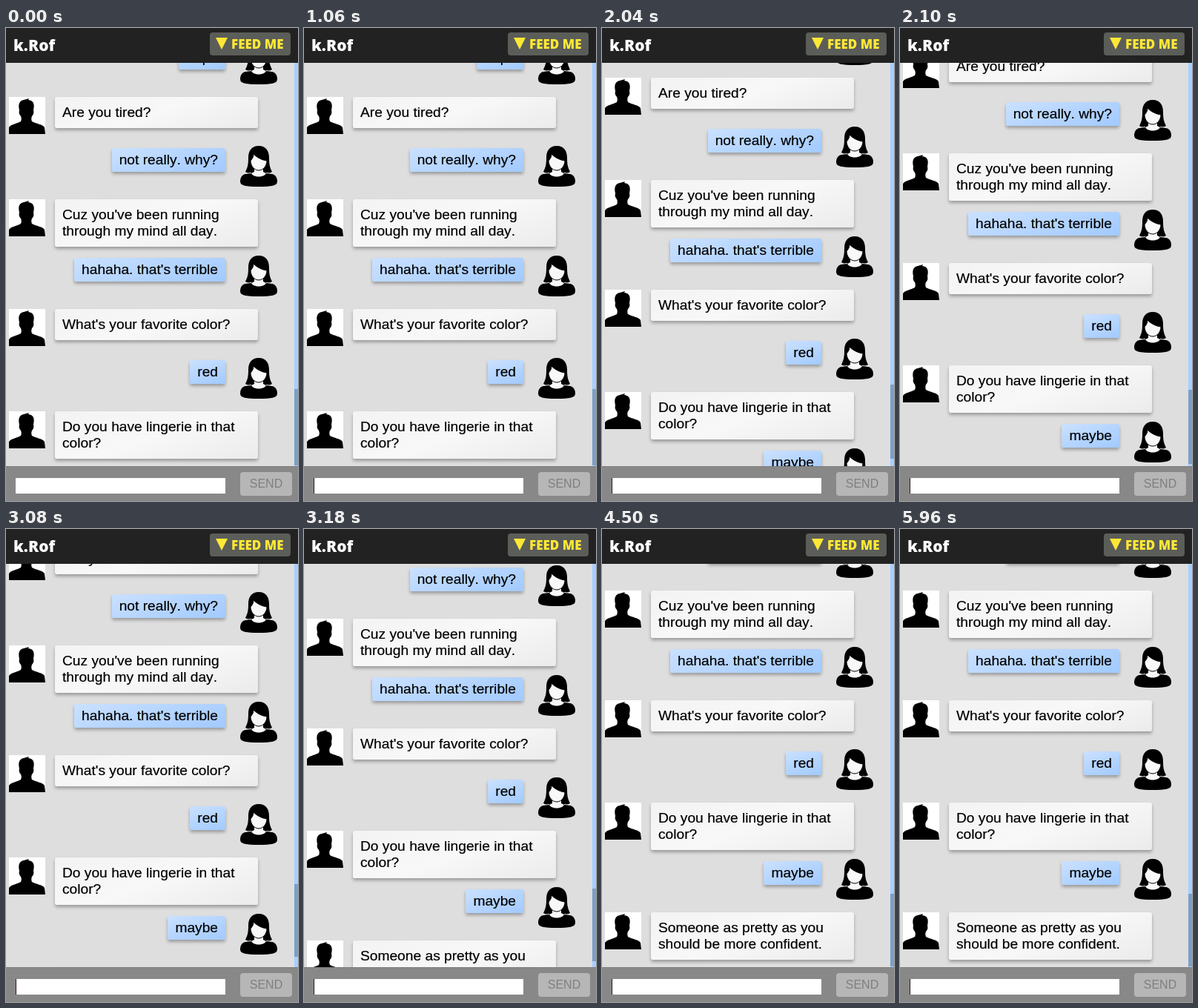
Write an HTML page that moves like this. It is 394 px wide and 638 px high and loops after 5980 ms.

```html
<!DOCTYPE html>
<html lang="en">
<head>
<meta charset="utf-8">
<title>Chat</title>
<style>
  html, body { margin: 0; width: 100%; height: 100%; overflow: hidden; }
  #stage { position: relative; width: 394px; height: 638px; overflow: hidden; background: #dedede; }
  #stage div, #stage svg { position: absolute; }
  #head { left: 0; top: 0; width: 394px; height: 47px; background: #222;
    font: 800 21px/46px "Open Sans", sans-serif; color: #fff; }
  #name { left: 10px; top: 0; white-space: nowrap; }
  #feed { left: 275px; top: 6px; width: 109px; height: 31px; border-radius: 4px; background: #5b5d59;
    font-size: 17px; line-height: 31px; color: #ffe835; }
  #feed span { position: absolute; left: 29px; white-space: nowrap; }
  #feed svg { left: 8px; top: 7px; }
  #list { left: 0; top: 0; width: 394px; }
  .bubble { box-sizing: border-box; border-radius: 3px; color: #000; white-space: pre;
    font: 19.2px/22px "Liberation Sans", Arial, sans-serif; font-kerning: none;
    -webkit-text-stroke: .2px #000; box-shadow: 0 3px 4px rgba(0, 0, 0, .3); }
  .bot { left: 66px; width: 274px; padding: 10px; background: linear-gradient(160deg, #f3f3f3, #f8f8f8 50%, #ebebeb); }
  .user { right: 98px; padding: 5px 10px; background: linear-gradient(160deg, #cbe1ff, #b5d5ff 50%, #a2caff); }
  #track { left: 389px; top: 47px; width: 5px; height: 544px; background: #a7cfff; }
  #thumb { left: 0; width: 5px; background: #7b9fc6; }
  #foot { left: 0; top: 591px; width: 394px; height: 47px; background: #888; box-shadow: inset 0 1px #7c7c7c; }
  #field { left: 13px; top: 16px; width: 283px; height: 21px; background: #fff; }
  #caret { left: 0; top: 0; width: 1px; height: 21px; background: #2e1d18; }
  #send { left: 316px; top: 8px; width: 70px; height: 32px; border-radius: 4px; background: #b6b6b6;
    color: #7f7f7f; text-align: center; font: 16px/31px "Liberation Sans", Arial, sans-serif; }
</style>
</head>
<body>
<div id="stage">
  <div id="list"></div>
  <div id="track"><div id="thumb"></div></div>
  <div id="head">
    <div id="name">k.Rof</div>
    <div id="feed">
      <svg width="16" height="16"><path d="M0 0H16L8 16Z" fill="#ffe835"/></svg>
      <span>FEED ME</span>
    </div>
  </div>
  <div id="foot">
    <div id="field"><div id="caret"></div></div>
    <div id="send">SEND</div>
  </div>
</div>
<script>
const $ = id => document.getElementById(id);
const LOOP = 5980, STEP = 20, VIEW = 543, CONTENT = 2862, CARET_ON = 20;

const messages = [
  ["user", "nope"],
  ["bot", "Are you tired?"],
  ["user", "not really. why?"],
  ["bot", "Cuz you've been running\nthrough my mind all day."],
  ["user", "hahaha. that's terrible"],
  ["bot", "What's your favorite color?"],
  ["user", "red"],
  ["bot", "Do you have lingerie in that\ncolor?"],
  ["user", "maybe"],
  ["bot", "Someone as pretty as you\nshould be more confident."]
];

// Each new message adds height to the list, then scrolls it into view.
const scrolls = [
  { start: 1966, length: 180, by: 73 },
  { start: 3062, length: 237, by: 75 }
];

const avatars = {
  bot: y => `<svg style="left:4px;top:${y}px" width="49" height="50">
    <path fill="#fff" d="M0 0H49V50H0Z"/>
    <path d="M0 50V41C2 37 11 36 16 33C17 31 17 28 16 26C14 24 13 21 14 18C12 10 14 5 20 4L27 2L26 4
      C33 5 35 9 33 18C34 21 33 24 31 26C30 28 30 31 31 33C36 36 46 37 48 41L49 50Z"/></svg>`,
  user: y => `<svg style="left:316px;top:${y - 3}px" width="50" height="55">
    <path d="M25 0C35 0 39 7 39 16C39 25 40 29 43 35C38 38 33 38 25 38S12 38 7 35C10 29 11 25 11 16C11 7 15 0 25 0Z"/>
    <path d="M0 48C0 41 4 38 10 37H40C46 38 50 41 50 48C50 54 42 55 25 55S0 54 0 48Z"/>
    <path fill="#f8f8f8" d="M19 30H31V35L35 37C32 43 18 43 15 37L19 35Z"/>
    <path fill="#f8f8f8" stroke="#000" d="M14 20C16 18 18 15 18 11C23 16 29 19 36 20C36 27 31 33 25 33S14 27 14 20Z"/>
    <path fill="none" stroke="#e6e6e6" d="M6 37.500L15 36.500M35 36.500L44 37.500"/></svg>`
};

let y = 24;
$("list").innerHTML = messages.map(([who, text]) => {
  const row = avatars[who](y) + `<div class="bubble ${who}" style="top:${y}px">${text}</div>`;
  y += text.includes("\n") ? 79 : 69;
  return row;
}).join("");

const swing = p => 0.5 - Math.cos(Math.PI * Math.min(1, Math.max(0, p))) / 2;

function draw(t) {
  let offset = 0, content = CONTENT;
  for (const { start, length, by } of scrolls) {
    offset += by * swing((t - start) / length);
    if (t >= start) content += by;
  }
  offset = Math.round(offset);
  $("list").style.transform = `translateY(${-offset}px)`;
  const scale = VIEW / content;
  $("thumb").style.top = Math.round((CONTENT - VIEW + offset) * scale) + "px";
  $("thumb").style.height = Math.round(VIEW * scale) + "px";
  $("caret").style.visibility = t >= CARET_ON ? "visible" : "hidden";
}

const begin = performance.now();
function tick() {
  const t = (performance.now() - begin) % LOOP;
  draw(Math.round(t / STEP) * STEP % LOOP);
  requestAnimationFrame(tick);
}
draw(0);
requestAnimationFrame(tick);
</script>
</body>
</html>
```
